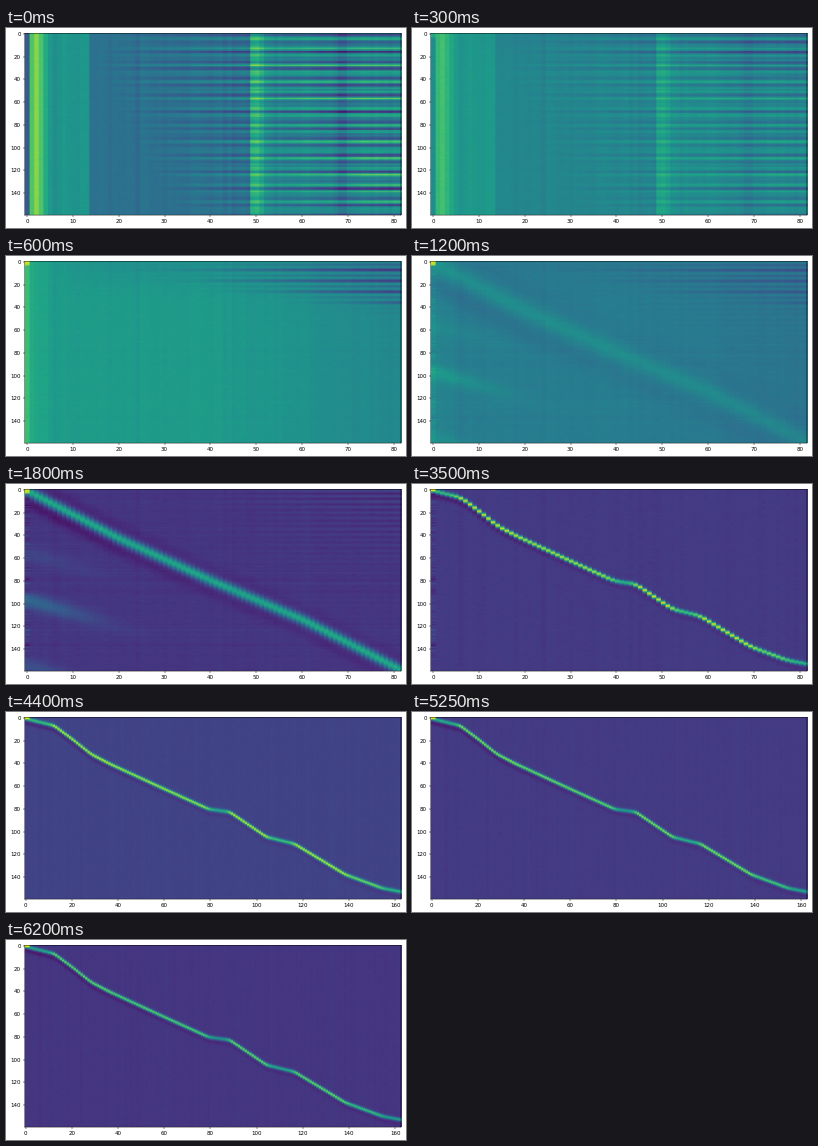
Recreate the animation shown at these times as a matplotlib script. Size 400 by 200 pixels, loop 6250 ms.

```python
import numpy as np
import matplotlib.pyplot as plt
from matplotlib.animation import FuncAnimation

plt.rcParams["font.family"] = "DejaVu Sans"

FRAMES, ROWS = 125, 160
SWITCH = 79  # decoder resolution doubles here

y = np.arange(ROWS)[:, None]
rng = np.random.default_rng(4)
ROW_TEX = rng.normal(0, 1, (ROWS, 1))
COL_TEX = rng.normal(0, 1, 163)

# alignment path as (column, row): first rough guess and settled shape
ROUGH = np.transpose([(0, 1), (20, 43), (40, 80), (60, 114.5), (81, 158)])
SETTLED = np.transpose([(0, 1), (6, 7), (10, 19), (14, 32), (18, 40.5), (30, 63),
                        (39.5, 80.5), (44, 83), (52, 105), (58, 111), (69, 138),
                        (77, 150), (81.5, 153.5)])


def gauss(v, mid, width):
    return np.exp(-0.5 * ((v - mid) / width) ** 2)


def ease(f, start, end):
    u = np.clip((f - start) / (end - start), 0, 1)
    return u * u * (3 - 2 * u)


def ripple(period, peak):
    return np.cos(2 * np.pi * (y - peak) / period)


def smooth(v, k):
    pad = np.pad(v, k, mode="reflect", reflect_type="odd")
    return np.convolve(pad, np.ones(2 * k + 1) / (2 * k + 1), "valid")


def untrained(x):
    base = 0.37 + 0.15 * (x < 13.5) + 0.07 * (x > 48.5) - 0.3 * (x < 0.5)
    base = base + 0.29 * gauss(x, 2, 1.2) + 0.2 * (x > 48.5) * gauss(x, 49.5, 1.5)
    base = base - 0.1 * gauss(x, 68.5, 1)
    grow = np.clip((x - 14 - 0.13 * np.abs(y - 28)) / 50, 0, 1)
    stripes = 0.16 * ripple(7.5, 5) + 0.12 * ripple(4.8, 4) + 0.05 * ROW_TEX
    return base + 0.01 * COL_TEX[:len(x)] + grow * stripes


def collapsed(x):
    base = 0.545 - 0.08 * ease(x, 35, 85) + 0.005 * COL_TEX[:len(x)]
    base = base + 0.12 * gauss(x, 0, 0.6) + 0.04 * gauss(x, 2, 2)
    reach = 1 / (1 + np.exp((y - 4 - x * 0.42) / 3))
    grow = ease(x, 15, 90) * reach
    stripes = 0.12 * ripple(4.8, 5) + 0.09 * ripple(9.6, 12) - 0.09
    return base - 0.04 * gauss(y, 0, 14) * ease(x, 0, 20) + grow * stripes + 0.003 * ROW_TEX


def aligned(x, f):
    k = len(x) // 82
    settle = ease(f, 36, 64)
    early = 1 - settle
    path = smooth(early * np.interp(x, *ROUGH) + settle * np.interp(x, *SETTLED), k)
    slope = smooth(np.gradient(path, x), k)
    sigma = 1.05 + 9 * np.exp(-(f - 14) / 15)
    peak = 0.72 * ease(f, 14, 52) - 0.1 * ease(f, 70, 124)
    flat = 0.85 - 0.4 * ease(f, 30, 50)
    amp = peak * (flat + (1 - flat) * np.clip(slope / 1.9, 0, 1.1))
    bg = 0.5 - 0.345 * ease(f, 12, 36) + 0.045 * gauss(f, 88, 12)

    m = bg + amp * gauss(y, path, sigma)
    # dark halo, strongest near the start
    halo = 0.4 + 0.6 * np.exp(-(x / 25) ** 2)
    m = m - 0.09 * halo * gauss(y, path + 3.4 * sigma, 1.3 * sigma)
    m = m - 0.05 * early * halo * gauss(y, path - 3.4 * sigma, 1.3 * sigma)
    # echoes of the path near the left edge
    fade = early * np.exp(-(x / 14) ** 2)
    for start, gain in ((56, 0.05), (97, 0.17), (155, 0.09)):
        m = m + gain * fade * gauss(y, start + 1.15 * x, 5)
    m = m + 0.06 * early * ease(x, 30, 85) * np.exp(-y / 45) * ripple(4.8, 1)
    m = m + 0.006 * early * ROW_TEX + 0.003 * COL_TEX[:len(x)]
    return m + 0.035 * (1 - ease(f, 70, 88)) * gauss(x, 0, 0.4) * ROW_TEX


def attention(f):
    n = 82 if f < SWITCH else 163
    x = np.arange(n) * 82 / (n + n % 2)
    fall, learn = min(f / 12, 1), ease(f, 13, 33)
    m = (1 - fall) * untrained(x) + fall * collapsed(x)
    m = (1 - learn) * m + learn * aligned(x, f)
    corner = ease(f, 3, 12) * (y < 4 - 2 * ease(f, 36, 64)) * (x < 0.6)
    m = m + corner * (0.97 - 0.04 * y - m)
    m = m + np.random.default_rng(f).normal(0, 0.004, m.shape)
    return np.repeat(np.repeat(m, 4, axis=0), 656 // n, axis=1)


fig = plt.figure(figsize=(10, 5), dpi=40, facecolor="white")
ax = fig.add_axes([18.6 / 400, 12.9 / 200, 376.3 / 400, 181.7 / 200])
img = ax.imshow(attention(0), cmap="viridis", vmin=0, vmax=1, aspect="auto",
                extent=(-0.5, 81.5, 159.5, -0.5), interpolation_stage="rgba")
ax.set_yticks(range(0, ROWS, 20))
for spine in ax.spines.values():
    spine.set_snap(False)


def update(f):
    n, step = (82, 10) if f < SWITCH else (163, 20)
    img.set_data(attention(f))
    img.set_extent((-0.5, n - 0.5, 159.5, -0.5))
    ax.set_xticks(range(0, n, step))
    ax.set_xlim(-0.5, n - 0.5)
    ax.set_ylim(159.5, -0.5)
    return [img]


anim = FuncAnimation(fig, update, frames=FRAMES, interval=50, repeat=True,
                     repeat_delay=0, blit=False)
plt.show()
```
